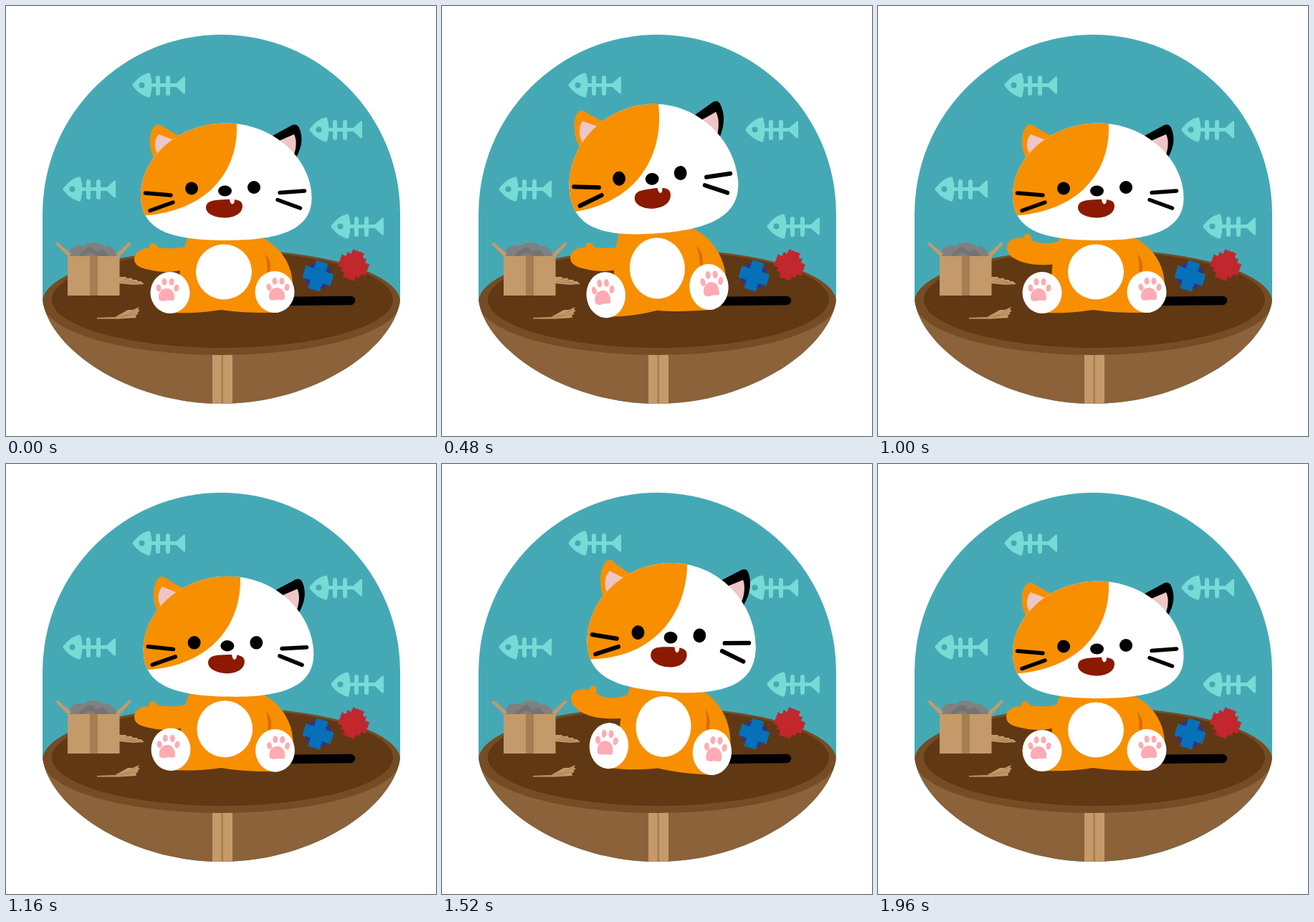
An HTML page that plays this animation: 600x600 px, repeating every 2000 ms.

```html
<!DOCTYPE html>
<html lang="en">
<head>
<meta charset="utf-8">
<title>Cat on a table</title>
<style>
  html, body { margin: 0; height: 100%; overflow: hidden; background: #fff; }
  svg { display: block; width: 100%; height: 100%; }
</style>
</head>
<body>
<svg viewBox="0 0 600 600">
  <defs>
    <clipPath id="dome"><path d="M51 290A249.5 250 0 0 1 550 290V410C541 479 429 555 300.500 555C172 555 60 479 51 410Z"/></clipPath>
    <path id="face" d="M307 163.5C375 163.5 426.5 215 426.5 268C426.5 313 380 327 307 327C234 327 188 315 188 264C188 212 240 163.5 307 163.5Z"/>
    <clipPath id="faceClip"><use href="#face"/></clipPath>
    <g id="fish" fill="#76dbd5" stroke="#76dbd5" stroke-linecap="round" stroke-linejoin="round">
      <path d="M179 110.5Q188 99 199 96Q203 110 199 125Q188 122 179 110.5Z" stroke-width="5"/>
      <path d="M202 110.5H240" stroke-width="5"/>
      <path d="M212 100V122M226 100V122" stroke-width="6"/>
      <path d="M237 110.5L248.500 100V121Z" stroke-width="3"/>
      <circle cx="189.500" cy="110.500" r="4" fill="#45a9b5" stroke="none"/>
    </g>
    <g id="paw" fill="#ffabb3">
      <path d="M213 408C212 398 219 394 224 394C231 394 236 400 235 409C234 413 228 410 224 411C220 412 214 413 213 408Z"/>
      <ellipse cx="213" cy="393.500" rx="3.500" ry="5" transform="rotate(-12 213 393.500)"/>
      <ellipse cx="221" cy="385" rx="3.500" ry="5"/>
      <ellipse cx="231" cy="385" rx="3.500" ry="5"/>
      <ellipse cx="238" cy="393.500" rx="3.500" ry="5" transform="rotate(12 238 393.500)"/>
    </g>
    <path id="cross" d="M-8-20H8V-8H20V8H8V20H-8V8H-20V-8H-8Z" stroke-width="1.500" stroke-dasharray="3 2"/>
  </defs>

  <g clip-path="url(#dome)">
    <rect width="600" height="600" fill="#45a9b5"/>
    <use href="#fish"/>
    <use href="#fish" x="247" y="62"/>
    <use href="#fish" x="-97" y="145"/>
    <use href="#fish" x="277" y="197"/>
    <path d="M51 412H550V600H51Z" fill="#8b6239"/>
    <path d="M288 480H316V560H288Z" fill="#c49a6b"/>
    <path d="M300.500 480H303V560H300.500Z" fill="#a67c52"/>
    <ellipse cx="300.500" cy="413" rx="249.500" ry="74" fill="#754c24"/>
    <ellipse cx="302" cy="409.500" rx="238" ry="67.500" fill="#603813"/>
  </g>

  <!-- box and shavings -->
  <g fill="#808080">
    <path d="M88 350Q87 340 96 335Q104 333 109 335Q116 328 128 331Q134 331 137 336Q145 333 147 338Q154 340 155 350Z"/>
    <path d="M101 350Q103 342 110 341Q115 334 122 338L126 343Q132 338 139 342L143 350Z" fill="#737373"/>
    <path d="M108 350Q113 343 121 345L128 350Z"/>
  </g>
  <g fill="#c49a6b">
    <path d="M86 349H158.500V404H86ZM69 332L72 329.500L91 346L87 350ZM171.500 329.500L175 332L158 350L153 347Z"/>
    <path d="M158 378L167 378L169 380L175 379.500L177 382L183 382L184 384L188 384L193 388L178 389L158 387Z"/>
    <path d="M127 435L152 434L163 428L170 424L177 424L186 420L184 424L187 425L183 428L185 429L181 432L182 435L158 436.500H127Z"/>
  </g>
  <path d="M117 349H128V404H117Z" fill="#a67c52"/>
  <path d="M159 384L181 387M165 381L186 387M150 435L168 431L182 424M160 435L182 429" fill="none" stroke="#a67c52"/>

  <!-- toys -->
  <g transform="translate(435.500 376.500) rotate(17)" fill="#0671b9" stroke="#0671b9">
    <path d="M-14-14H14V14H-14Z" fill="#2e3192" stroke="#2e3192" stroke-width="1.500" stroke-dasharray="3 2"/>
    <use href="#cross"/>
  </g>
  <g transform="translate(485 361.500) rotate(20)" fill="#c1272d" stroke="#c1272d">
    <path d="M-13.500-13.500H13.500V13.500H-13.500Z" stroke-width="1.500" stroke-dasharray="3 2"/>
    <use href="#cross"/>
  </g>

  <path d="M390 412L481 411" stroke="#000" stroke-width="12.500" stroke-linecap="round"/>

  <path id="arm" fill="#f78f00"/>

  <g id="cat">
    <path fill="#f78f00" d="M255 320C245 345 241 365 243 385L233 428C262 429 280 427 300 424C325 428 350 428 380 428L399 405C405 370 388 335 350 320Z"/>
    <path fill="#e0690a" d="M361.500 345C368 353 371 362 368 371Q365 374 364 368Q365 357 361.500 345Z"/>
    <ellipse cx="304" cy="371" rx="39" ry="38.500" fill="#fff"/>
    <ellipse cx="229" cy="400" rx="27.500" ry="29" fill="#fff"/>
    <ellipse cx="375" cy="399" rx="27.500" ry="29" fill="#fff"/>
    <use href="#paw"/>
    <use href="#paw" x="154" y="-1"/>

    <path fill="#f78f00" d="M206 211C198 196 200 173 208 167C212 164 216 166 220 169L243 182Z"/>
    <path fill="#eec6c6" d="M211 206C206 196 207 186 213 179L234 187Z"/>
    <path d="M372 181L396 168C402 164 407 165 409 170C415 183 413 197 405 211Z"/>
    <path fill="#eec6c6" d="M379 189L402 179C406 187 405 198 402 207Z"/>
    <use href="#face" fill="#fff"/>
    <path clip-path="url(#faceClip)" fill="#f78f00" d="M321 155C329 220 290 287 188 293H180V155Z"/>
    <circle cx="259" cy="254.500" r="9"/>
    <circle cx="346" cy="253" r="9"/>
    <ellipse cx="305.500" cy="258" rx="9.500" ry="7.500"/>
    <path d="M194.500 261L230 264M201 285.500L233 274M382 260.500L416.500 258M379 270.500L410.500 282" stroke="#000" stroke-width="5.500" stroke-linecap="round"/>
    <path fill="#8b1a00" d="M279 281C280 271 290 271 305 270C322 269 330 271 330 279C330 290 318 295.500 304 295.500C291 295 279 290 279 281Z"/>
    <path fill="#fff" d="M312 269.500C313 278.500 319 279 319 269.500Z"/>
  </g>
</svg>
<script>
  const arm = document.getElementById('arm');
  const cat = document.getElementById('cat');
  // [time, value] keys, eased in and out between neighbours
  const swayKeys = [[0, 0], [480, -1], [960, 0], [1000, 0], [1480, 1], [1960, 0], [2000, 0]];
  const waveKeys = [[0, 0], [240, 1], [520, 0], [880, 1], [1160, 0], [1520, 1], [1960, 0], [2000, 0]];

  // the same outline with the arm lowered and raised
  const armLow = 'M280 331C260 333 245 338 235 338C226 338.5 218 338 212 337C211 333 207 331 203 331.5C199 332 200 336 201 338C188 337 179 344 179 353C179 362 188 366 200 368C215 372 235 372 250 367L280 366Z';
  const armHigh = 'M280 316C262 322 255 324 242 326C230 327 220 325 215 319C217 313 214 309 210 309.5C206 310 206 314 204 316C192 311 180 317 180 327C180 338 192 346 205 351C218 355 230 356 250 355L280 355Z';
  const highNumbers = armHigh.match(/[\d.]+/g);

  function valueAt(keys, t) {
    const i = keys.findIndex(k => k[0] > t);
    const [t0, a] = keys[i - 1], [t1, b] = keys[i];
    const u = (t - t0) / (t1 - t0);
    return a + (b - a) * u * u * (3 - 2 * u);
  }

  function armPath(wave) {
    let i = 0;
    return armLow.replace(/[\d.]+/g, n => +n + (highNumbers[i++] - n) * wave);
  }

  function draw() {
    const t = Math.floor(performance.now() % 2000 / 40) * 40;
    const sway = valueAt(swayKeys, t);
    const lift = Math.abs(sway);
    cat.setAttribute('transform',
      `translate(${302 + .8 * lift} ${428 + lift}) rotate(${4 * sway}) scale(${1 - .012 * lift} ${1 + .105 * lift}) translate(-302 -428)`);
    arm.setAttribute('d', armPath(valueAt(waveKeys, t)));
    requestAnimationFrame(draw);
  }
  draw();
</script>
</body>
</html>
```
